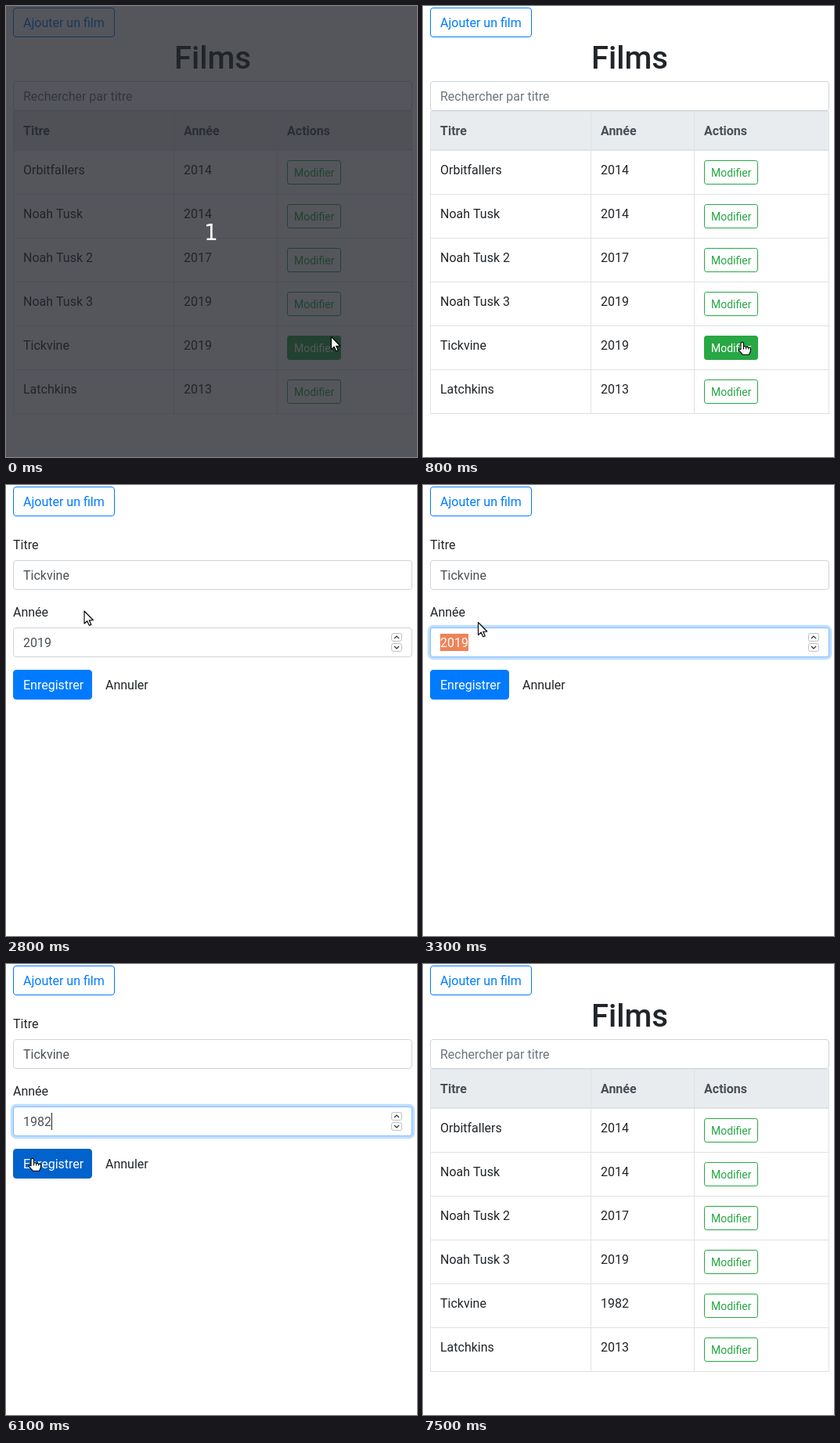
Write an HTML page with a canvas that moves like this. It is 525 by 576 pixels and loops after 7700 ms.

```html
<!DOCTYPE html>
<html lang="fr">
<head>
<meta charset="utf-8">
<title>Films</title>
<style>
  html, body { margin: 0; width: 100%; height: 100%; overflow: hidden; background: #fff; }
  canvas { display: block; width: 525px; height: 576px; }
</style>
</head>
<body>
<canvas id="stage" width="525" height="576"></canvas>
<script>
const ctx = document.getElementById('stage').getContext('2d');
const LOOP = 7700, STEP = 100;
const BLUE = '#007bff', GREEN = '#28a745', INK = '#212529', GREY = '#495057', LINE = '#dee2e6';

const films = [
  ['Orbitfallers', '2014'],
  ['Noah Tusk', '2014'],
  ['Noah Tusk 2', '2017'],
  ['Noah Tusk 3', '2019'],
  ['Tickvine', '2019'],
  ['Latchkins', '2013']
];
const EDITED = 4;

// Pointer: start time, x, y, shape; only same-run points are interpolated
const pointer = [
  [0, 415, 422, 'arrow', 'hold'],
  [300, 412, 425, 'hand', 'hold'],
  [400, 412, 426, 'hand', 'hold'],
  [800, 408, 429, 'hand', 'hold'],
  [2000, 408, 429, 'arrow'],
  [2200, 290, 220, 'arrow'],
  [2400, 150, 73, 'arrow', 'hold'],
  [2500, 150, 73, 'arrow'],
  [2600, 132, 105, 'beam'],
  [2700, 115, 135, 'arrow'],
  [2900, 84, 186, 'beam'],
  [3000, 72, 201, 'beam', 'hold'],
  [3200, 71, 190, 'beam', 'hold'],
  [3300, 70, 175, 'arrow', 'hold'],
  [5300, 66, 188, 'beam'],
  [5400, 60, 201, 'beam', 'hold'],
  [5500, 0, 0, 'none', 'hold'],
  [6000, 34, 248, 'hand', 'hold'],
  [6400, 34, 248, 'arrow'],
  [6600, 140, 236, 'arrow', 'hold'],
  [6800, 140, 236, 'arrow'],
  [7300, 83, 12, 'arrow', 'hold'],
  [7500, 0, 0, 'none', 'hold']
];

const latest = (list, t) => list.reduce((found, item) => item[0] <= t ? item : found);

function rect(x, y, w, h, color) {
  ctx.fillStyle = color;
  ctx.fillRect(x, y, w, h);
}

function box(x, y, w, h, border, fill, r = 4) {
  ctx.beginPath();
  ctx.roundRect(x + .5, y + .5, w - 1, h - 1, r - .5);
  if (fill) { ctx.fillStyle = fill; ctx.fill(); }
  ctx.lineWidth = 1;
  ctx.strokeStyle = border;
  ctx.stroke();
}

function text(s, x, y, color = INK, size = 16, weight = 400, align = 'left', family = 'Roboto') {
  ctx.font = `${weight} ${size}px "${family}", sans-serif`;
  ctx.textAlign = align;
  ctx.fillStyle = color;
  ctx.fillText(s, x, y);
}

function lines(points, close) {
  ctx.beginPath();
  points.forEach(([x, y]) => ctx.lineTo(x, y));
  if (close) ctx.closePath();
}

function addButton() {
  box(9, 2, 130, 38, BLUE);
  text('Ajouter un film', 22, 27, BLUE);
}

function listPage(t) {
  text('Films', 264, 80, INK, 40, 500, 'center');
  box(9, 96, 510, 38, '#ced4da');
  text('Rechercher par titre', 22, 121, '#6c757d');

  rect(9, 134, 510, 50, '#e9ecef');
  rect(9, 134, 510, 1, LINE);
  rect(9, 183, 510, 2, LINE);
  [9, 214, 346, 518].forEach(x => rect(x, 134, 1, 387, LINE));
  text('Titre', 22, 165, GREY, 16, 700);
  text('Année', 227, 165, GREY, 16, 700);
  text('Actions', 359, 165, GREY, 16, 700);

  films.forEach(([title, year], i) => {
    const y = 184 + i * 56;
    const hover = i === EDITED && t < 2000;
    rect(9, y + 56, 510, 1, LINE);
    text(title, 22, y + 31);
    text(i === EDITED && t >= 6300 ? '1982' : year, 227, y + 31);
    box(359, y + 13, 69, 31, GREEN, hover && GREEN, 3.2);
    text('Modifier', 368, y + 34, hover ? '#fff' : GREEN, 14);
  });
}

function spinner() {
  [[189, -1], [202, 1]].forEach(([y, dir]) => {
    box(492, y, 14, 11, '#c3c3c3', '#fafafa', 3);
    const mid = y + 5.5;
    lines([[496, mid - dir * 1.5], [499, mid + dir * 1.5], [502, mid - dir * 1.5]]);
    ctx.strokeStyle = '#333';
    ctx.lineWidth = 1.2;
    ctx.stroke();
  });
}

function yearField(t) {
  const focus = t < 3000 ? 0 : t < 3200 ? .6 : 1;
  if (focus) {
    const g = 3.2 * focus;
    ctx.beginPath();
    ctx.roundRect(9 - g, 182 - g, 510 + 2 * g, 38 + 2 * g, 4 + g);
    ctx.fillStyle = `rgba(0,123,255,${.25 * focus})`;
    ctx.fill();
  }
  box(9, 182, 510, 38, focus ? '#80bdff' : '#ced4da', '#fff');

  const selected = t >= 3200 && t < 3900;
  const typed = [3900, 4300, 4800, 5100].filter(at => at <= t).length;
  if (selected) rect(22, 190, 36, 22, '#ef8257');
  text(typed ? '1982'.slice(0, typed) : '2019', 22, 207, selected ? '#fff' : GREY);
  if (t >= 4100) rect(22 + typed * 9, 190, 1, 22, INK);
  spinner();
}

function formPage(t) {
  text('Titre', 9, 82);
  box(9, 96, 510, 38, '#ced4da');
  text(films[EDITED][0], 22, 121, GREY);
  text('Année', 9, 168);
  yearField(t);
  const fill = t >= 6100 ? '#0062cc' : t >= 6000 ? '#0069d9' : BLUE;
  box(9, 236, 101, 38, fill, fill);
  text('Enregistrer', 22, 261, '#fff');
  text('Annuler', 127, 261);
}

const shapes = {
  none() {},
  arrow() {
    lines([[.5, .5], [.5, 16.5], [4.2, 13.2], [6.8, 18.8], [9.2, 17.7], [6.7, 12.3], [11.8, 12]], true);
    ctx.shadowColor = 'rgba(0,0,0,.3)';
    ctx.shadowBlur = 2;
    ctx.shadowOffsetX = ctx.shadowOffsetY = 1;
    ctx.fill();
    ctx.shadowColor = 'transparent';
    ctx.stroke();
  },
  hand() {
    ctx.beginPath();
    ctx.moveTo(-2, 10);
    ctx.lineTo(-2, 1.5);
    ctx.quadraticCurveTo(-.2, -1, 1.5, 1.5);
    ctx.lineTo(1.5, 6);
    ctx.quadraticCurveTo(3.5, 5, 4.6, 6.6);
    ctx.quadraticCurveTo(6.8, 5.8, 7.6, 7.4);
    ctx.quadraticCurveTo(10.5, 6.8, 10.5, 9.5);
    ctx.lineTo(10.2, 12.5);
    ctx.lineTo(8.5, 16.3);
    ctx.lineTo(.5, 16.3);
    ctx.lineTo(-4.6, 10.6);
    ctx.quadraticCurveTo(-5.2, 7.6, -2, 10);
    ctx.fill();
    ctx.stroke();
    [1.5, 4.6, 7.6].forEach((x, i) => {
      lines([[x, 6 + i * .6], [x, 9.5]]);
      ctx.stroke();
    });
  },
  beam() {
    lines([[-3, -8], [0, -7], [3, -8], [0, -7], [0, 7], [-3, 8], [0, 7], [3, 8]]);
    ctx.stroke();
  }
};

function drawPointer(t) {
  const now = latest(pointer, t);
  const next = pointer[pointer.indexOf(now) + 1];
  const [at, x, y, shape, hold] = now;
  const k = hold ? 0 : (t - at) / (next[0] - at);
  ctx.save();
  ctx.translate(k ? x + (next[1] - x) * k : x, k ? y + (next[2] - y) * k : y);
  ctx.fillStyle = '#fff';
  ctx.strokeStyle = '#000';
  ctx.lineWidth = 1.1;
  ctx.lineJoin = 'round';
  shapes[shape]();
  ctx.restore();
}

function draw(t) {
  rect(0, 0, 525, 576, '#fff');
  addButton();
  if (t >= 2000 && t < 6300) formPage(t);
  else listPage(t);
  if (t < 300) {
    rect(0, 0, 525, 576, 'rgba(33,36,42,.77)');
    text('1', 262, 299, '#fff', 28, 400, 'center', 'DejaVu Sans');
  }
  drawPointer(t);
}

const start = performance.now();
function tick() {
  const t = (performance.now() - start) % LOOP;
  draw(Math.floor(t / STEP) * STEP);
  requestAnimationFrame(tick);
}
tick();
</script>
</body>
</html>
```
